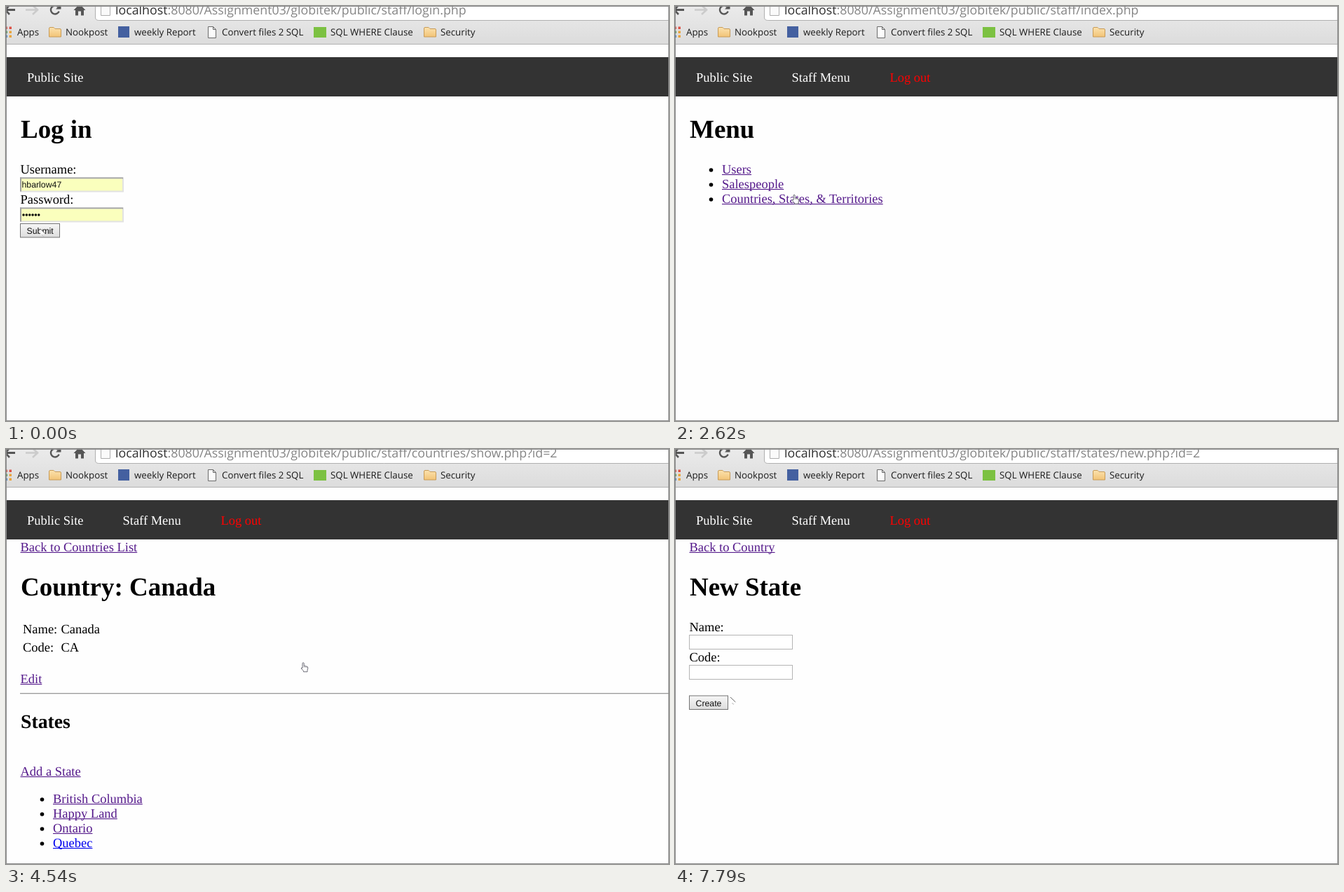
An HTML page with a canvas that plays this animation: 946 by 592 pixels, repeating every 8000 ms.

```html
<!DOCTYPE html>
<html lang="en">
<head>
<meta charset="utf-8">
<title>Staff area walkthrough</title>
<style>
html, body { margin: 0; width: 100%; height: 100%; overflow: hidden; background: #fefefe; }
canvas { display: block; }
</style>
</head>
<body>
<canvas id="stage" width="946" height="592"></canvas>
<script>
const W = 946, H = 592, LOOP = 8000;
const ctx = document.getElementById('stage').getContext('2d');
const SERIF = '"Liberation Serif", "Times New Roman", serif';
const SANS = '"Liberation Sans", Arial, sans-serif';
const UI = '"Open Sans", "Noto Sans", sans-serif';
const BODY = 18.48;
const VISITED = '#551a8b', FRESH = '#0000ee', ACTIVE = '#ff0000';
const SITE = '/Assignment03/globitek/public/staff/';

// ---------- helpers ----------
function rect(x, y, w, h, color) {
  ctx.fillStyle = color;
  ctx.fillRect(x, y, w, h);
}

function box(x, y, w, h, fill, line) {
  rect(x, y, w, h, line);
  rect(x + 1, y + 1, w - 2, h - 2, fill);
}

function fade(y0, y1, from, to) {
  const g = ctx.createLinearGradient(0, y0, 0, y1);
  g.addColorStop(0, from);
  g.addColorStop(1, to);
  return g;
}

function shape(d, fill, line, width = 1) {
  const p = new Path2D(d);
  if (fill) { ctx.fillStyle = fill; ctx.fill(p); }
  if (line) { ctx.strokeStyle = line; ctx.lineWidth = width; ctx.stroke(p); }
}

function dot(x, y, r) {
  ctx.fillStyle = '#000';
  ctx.beginPath();
  ctx.arc(x, y, r, 0, Math.PI * 2);
  ctx.fill();
}

// Draws a line of text and returns its width.
function write(str, x, y, font, color = '#000') {
  ctx.font = font;
  ctx.fillStyle = color;
  ctx.fillText(str, x, y);
  return ctx.measureText(str).width;
}

const text = (str, x, y, color) => write(str, x, y, `${BODY}px ${SERIF}`, color);
const bold = (str, x, y, scale = 1) => write(str, x, y, `bold ${BODY * scale}px ${SERIF}`);
const title = (str, y) => bold(str, 21, y, 2);
const small = (str, x, y) => write(str, x, y, `12.3px ${SANS}`, '#111');
const label = (str, x) => write(str, x, 42, `13.3px ${UI}`, '#1c1c1c');

function link(str, x, y, color = VISITED) {
  rect(x, y + 1, text(str, x, y, color), 1.1, color);
}

function list(items, y) {
  items.forEach(([str, color], i) => {
    dot(51.5, y + i * 21 - 5, 2.8);
    link(str, 67, y + i * 21, color);
  });
}

function button(str, y, w, pressed) {
  const light = '#f7f7f7', dark = '#dcdcdc';
  const fill = pressed ? fade(y, y + 21, '#c8c8c8', '#e4e4e4') : fade(y, y + 21, light, dark);
  box(20, y, w, 20.5, fill, '#747474');
  small(str, 29.5, y + 15);
}

function filledInput(y) {
  rect(20, y, 148, 21, '#e2e2e2');
  rect(20, y, 147, 2, '#a2a2a2');
  rect(20, y, 2, 20, '#a2a2a2');
  rect(22, y + 2, 144, 17, '#faffbd');
}

// ---------- browser frame ----------
function folder(x) {
  shape(`M${x} 44V32q0-1.5 1.5-1.5h5l2 2h7q1.5 0 1.5 1.5v10z`, fade(30, 45, '#fbe3b0', '#f2c172'), '#c79b58');
}

function reloadIcon() {
  ctx.strokeStyle = '#565656';
  ctx.lineWidth = 2.4;
  ctx.beginPath();
  ctx.arc(70, 5.5, 6, 0.35, 5.5);
  ctx.stroke();
  shape('M71 4.5h7.5v-7.5z', '#565656');
}

function toolbar(url, loading) {
  rect(0, 0, W, 54, fade(0, 54, '#ebebeb', '#dcdcdc'));
  rect(0, 54, W, 1, '#b2b2b2');
  shape('M127.5-4V16q0 4.5 5 4.5H950V-4z', '#fff', '#b0b0b0');

  shape('M0 5.5H13', null, '#565656', 3);
  shape('M5-1L-1 5.5L5 12', null, '#565656', 2.6);
  shape('M28 5.5H43M38-1L45 5.5L38 12', null, '#cbcbcb', 2.6);
  if (loading) shape('M64-1L76 11M76-1L64 11', null, '#565656', 2.6);
  else reloadIcon();
  shape('M96.5 6L105-3L113.5 6H111V13.5H107V7.5H103V13.5H99V6z', '#565656');
  shape('M135.500-4V13.500H148.500V-4', '#fafafa', '#adadad');

  const font = `17.8px ${UI}`;
  const w = write('localhost', 156, 12, font, '#303030');
  write(':8080' + SITE + url, 156 + w, 12, font, '#858585');

  ['#dd5348', '#58a05c', '#4c8bd0'].forEach((c, i) => rect(0, 29.5 + i * 6, 2, 3.5, c));
  ['#dd5348', '#e9a53f', '#e9a53f'].forEach((c, i) => rect(4.5, 29.5 + i * 6, 3.5, 3.5, c));
  label('Apps', 16);
  folder(61.5);
  label('Nookpost', 85);
  rect(160, 29, 16, 16, '#4460a0');
  label('weekly Report', 183);
  shape('M288.500 29.500H295.500L299.500 33.500V45.500H288.500zM295.500 29.500V33.500H299.500', '#fcfcfc', '#6a6a6a');
  label('Convert files 2 SQL', 308);
  rect(439, 30, 18, 15, '#7cc142');
  label('SQL WHERE Clause', 463);
  folder(596.5);
  label('Security', 620);
}

function navBar(signedIn) {
  rect(0, 73, W, 56, '#333');
  text('Public Site', 30, 108, '#fff');
  if (!signedIn) return;
  text('Staff Menu', 166.5, 108, '#fff');
  text('Log out', 306.5, 108, '#f00');
}

// ---------- pages ----------
function loginPage(t) {
  title('Log in', 188);
  text('Username:', 20.5, 239);
  filledInput(244.5);
  small('hbarlow47', 22.5, 259);
  text('Password:', 20.5, 282);
  filledInput(287.5);
  for (let i = 0; i < 6; i++) dot(25 + i * 4.35, 298, 1.75);
  button('Submit', 310, 57, t >= 120 && t < 240);
}

function menuPage(t) {
  title('Menu', 188);
  list([['Users'], ['Salespeople'],
    ['Countries, States, & Territories', t >= 3040 ? ACTIVE : VISITED]], 239);
}

function countriesPage(t) {
  title('Countries', 188);
  link('Add a Country', 20.5, 239);
  bold('Name', 128.5, 284);
  bold('Code', 318.5, 284);
  const row = (name, code, y, show, edit) => {
    text(name, 24, y);
    text(code, 284, y);
    link('Show', 398, y, show);
    link('Edit', 514.5, y, edit);
  };
  row('Canada', 'CA', 309.5, t >= 4260 ? ACTIVE : VISITED, VISITED);
  row('United States', 'US', 335, VISITED, FRESH);
}

function countryPage(t) {
  link('Back to Countries List', 20.5, 146);
  title('Country: Canada', 209);
  text('Name:', 24, 263);
  text('Canada', 78.5, 263);
  text('Code:', 24, 289);
  text('CA', 78.5, 289);
  link('Edit', 20.5, 334);
  rect(20, 348, W, 1, '#9a9a9a');
  rect(20, 349, W, 1, '#dedede');
  bold('States', 21, 398, 1.5);
  link('Add a State', 20.5, 466, t >= 6110 ? ACTIVE : VISITED);
  list([['British Columbia'], ['Happy Land'], ['Ontario'], ['Quebec', FRESH]], 505);
}

function newStatePage() {
  link('Back to Country', 20.5, 146);
  title('New State', 209);
  text('Name:', 20.5, 260);
  box(20, 265, 148, 21, '#fff', '#b4b4b4');
  text('Code:', 20.5, 303);
  box(20, 308, 148, 21, '#fff', '#b4b4b4');
  button('Create', 351.5, 56);
}

const pages = [
  { from: 0, url: 'login.php', draw: loginPage },
  { from: 540, url: 'index.php', draw: menuPage },
  { from: 3160, url: 'countries/index.php', draw: countriesPage },
  { from: 4540, url: 'countries/show.php?id=2', draw: countryPage },
  { from: 6240, url: 'states/new.php?id=2', draw: newStatePage }
];

// ---------- pointer ----------
// Each move holds its points for a fixed step; "hand" marks the points over a link.
const moves = [
  { from: 0, step: 1, hand: 'a', path: [[49, 318]] },
  { from: 1950, step: 134, hand: 'aahhahh',
    path: [[58, 314], [84, 298], [118, 280], [148, 268], [166, 263], [170, 269], [170, 271]] },
  { from: 3540, step: 144, hand: 'aaaaah',
    path: [[186, 278], [290, 300], [420, 318], [496, 322], [450, 314], [424, 304.5]] },
  { from: 4980, step: 140, hand: 'aaaahh',
    path: [[408, 318], [330, 362], [228, 416], [140, 456], [98, 464], [86.5, 456.5]] },
  { from: 6670, step: 163, hand: 'aaaaaaaa',
    path: [[88, 452], [90, 436], [89, 414], [87, 392], [85, 372], [83, 356], [81, 348]] },
  { from: 7790, step: 1, hand: 'a', path: [[79, 354]] }
];

const latest = (items, t) => items.filter(item => item.from <= t).pop();

function pointer(t) {
  const { from, step, hand, path } = latest(moves, t);
  const i = Math.min(path.length - 1, Math.floor((t - from) / step));
  ctx.save();
  ctx.translate(...path[i]);
  if (hand[i] === 'h') {
    shape('M-1 8V1Q.1-.6 1.200 1V5Q2.500 4.200 3 5.500Q4.500 4.800 5 6Q6.800 5.600 6.800 8L6 11V13.300H.5V12L-2.800 8.600Q-2.500 6.800-1 8z',
      '#fff', '#5c5c68', 0.9);
    shape('M1.200 5V7M3 5.500V7.300M5 6V7.500', null, '#77777f', 0.7);
  } else {
    shape('M0 0V9L2.200 7.200L3.800 10.500L5.200 9.800L4 7H7z', '#fff');
    shape('M0 0L7.300 7', null, '#666', 1);
    shape('M2.500 8L4.300 10.300L5 9.500', null, '#aaa', 0.9);
  }
  ctx.restore();
}

// ---------- loop ----------
function render(t) {
  const page = latest(pages, t);
  ctx.textRendering = 'geometricPrecision';
  rect(0, 0, W, H, '#fefefe');
  toolbar(page.url, t >= 240 && t < 540);
  navBar(t >= 540);
  page.draw(t);
  pointer(t);
  ctx.strokeStyle = '#8c8c8c';
  ctx.lineWidth = 1;
  ctx.strokeRect(0.5, 0.5, W - 1, H - 1);
}

const start = performance.now();
function tick() {
  render((performance.now() - start) % LOOP);
  requestAnimationFrame(tick);
}
tick();
</script>
</body>
</html>
```
